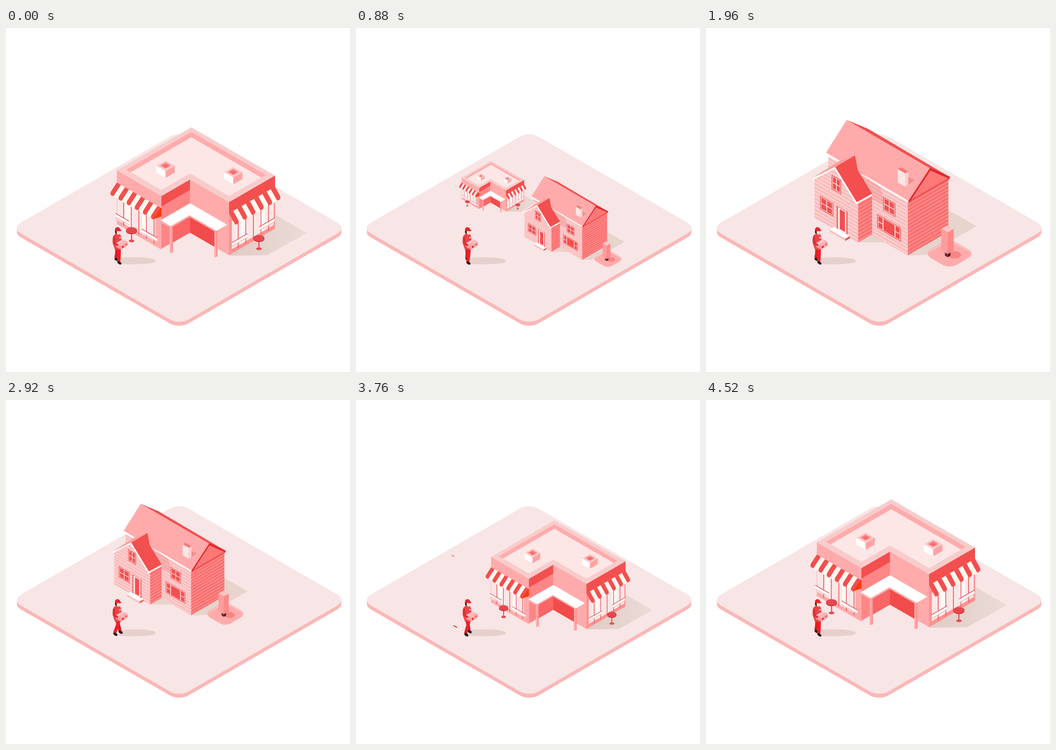
These frames come from a looping animation (748 by 748 pixels, 5.24 s). An HTML page:

```html
<!DOCTYPE html>
<html>
<head>
<meta charset="utf-8">
<style>
html, body { margin: 0; width: 100%; height: 100%; overflow: hidden; background: #fff }
svg { display: block; width: 100vw; height: 100vh }
</style>
</head>
<body>
<svg id="stage" viewBox="0 0 748 748"></svg>
<script>
const RED = '#f34f4f', DEEP = '#e5262b', PINK = '#ffabab', MID = '#ff8686', PALE = '#fde6e6', RIM = '#f9cccc', FRAME = '#ee6a6c';
const SHINE = '#fff8f6', SHADOW = '#e6d4cd';
const K = Math.tan(Math.PI / 6); // slope of every isometric edge

const poly = (fill, points) => `<polygon fill="${fill}" points="${points}"/>`;
const path = (fill, d) => `<path fill="${fill}" d="${d}"/>`;
const line = (color, width, d, cap = 'butt') =>
  `<path fill="none" stroke="${color}" stroke-width="${width}" stroke-linecap="${cap}" d="${d}"/>`;
const oval = (fill, x, y, rx, ry, turn = 0) =>
  `<ellipse fill="${fill}" cx="${x}" cy="${y}" rx="${rx}" ry="${ry}" transform="rotate(${turn} ${x} ${y})"/>`;
const rect = (fill, x, y, w, h) => `<rect fill="${fill}" x="${x}" y="${y}" width="${w}" height="${h}"/>`;
const repeat = (n, f) => [...Array(n).keys()].map(f).join('');

// Upright face: dir 1 looks to the lower left, -1 to the lower right
const wall = (fill, x, y, w, h, dir = 1) => path(fill, `M${x} ${y}l${w} ${w * K * dir}v${h}l${-w} ${-w * K * dir}z`);

// Level face from its back corner; steps alternate right-down and left-down
const level = (fill, x, y, steps) =>
  path(fill, `M${x} ${y}` + steps.map((s, i) => `l${i % 2 ? -s : s} ${s * K}`).join('') + 'z');

// Box from its front top corner
const box = (x, y, a, b, h, left, right, top) => wall(left, x - a, y - a * K, a, h) + wall(right, x, y, b, h, -1) +
  level(top, x + b - a, y - (a + b) * K, [a, b, -a]);

const roundTile = (fill, x, y, size, r) => `<rect fill="${fill}" x="${-size / 2}" y="${-size / 2}" width="${size}"
  height="${size}" rx="${r}" transform="matrix(.866 .5 -.866 .5 ${x} ${y})"/>`;

const siding = (id, turn, base, stripe) =>
  `<pattern id="${id}" width="20" height="8" patternUnits="userSpaceOnUse" patternTransform="skewY(${turn})">
    ${rect(base, 0, 0, 20, 8)}${rect(stripe, 0, 0, 20, 3.6)}</pattern>`;

const ground = () => repeat(3, i => roundTile(i < 2 ? '#fbb7b7' : '#f8e5e5', 376.5, 443.5 - i * 4.25, 421, 23));

// Striped cloth hung from a top edge of width w, leaning out by dx
function awning(x, y, w, dir, dx) {
  const n = 11, sx = w / n, sy = sx * K * dir, drop = 20;
  return repeat(n, i => path(i % 2 ? '#fff8ee' : RED, `M${x + sx * i} ${y + sy * i}l${sx} ${sy}l${dx} ${drop}
    q${dx * .2} 6 ${dx * .2 - sx / 2} ${6 - sy / 2}q${-sx / 2} ${-sy / 2} ${-sx / 2 - dx * .2} ${-6 - sy / 2}z`));
}

const vent = (x, y) => box(x, y, 20, 20, 15, '#fff', '#ffa3a3', RIM) +
  level(MID, x, y - 19, [12, 12, -12]) + level('#f76b6b', x, y - 15, [7, 7, -7]);

const table = (x, y) => oval('#e8484c', x, y + 23, 6, 3) + line(RED, 2.5, `M${x} ${y}v23`) +
  oval('#b93640', x, y + 1.5, 12, 7) + oval('#e5474c', x, y, 12, 7);

const ledge = (x, y, w, dir) => wall('#e2575c', x, y - 5, w, 2, dir) + wall('#fff', x, y - 3, w, 6, dir) +
  wall('#f7b9b9', x, y + 3, w, 2, dir);

const shopWindow = (x, y, w, dir) => wall(PALE, x, y, w, 61, dir) +
  [.2, .65].map(k => wall(SHINE, x + w * k, y + w * k * K * dir, 13, 61, dir)).join('') +
  repeat(5, i => wall('#e2575c', x + 13 + 16.5 * i, y + (13 + 16.5 * i) * K * dir, 1.7, 66, dir));

function shop() {
  const roof = (fill, y, inset) => level(fill, 403, y, [182 - inset, 100 - inset, -85, 62, inset - 97]);
  const counter = (fill, y) => level(fill, 400, y, [81, 23, -59, 41, -22]);
  const post = (x, y) => rect(PINK, x, y, 4, 57) + rect('#ff9090', x + 4, y, 3, 56);
  return poly('url(#shade)', '485,495 568,494 654,446 585,406') +
    wall(PINK, 241, 309, 97, 117) +
    wall(MID, 338, 365, 62, 115, -1) + wall(RED, 338, 365, 62, 23, -1) +
    wall(PINK, 400, 329, 85, 116) +
    wall('#ff9292', 485, 378, 100, 116, -1) + wall(RED, 485, 378, 100, 25, -1) +
    roof(RIM, 216, 0) + roof(PINK, 226, 20) + roof(PALE, 237.5, 30) +
    vent(347, 311) + vent(494, 325) +
    shopWindow(242, 356, 83, 1) + ledge(238, 407, 30, 1) + ledge(295, 441, 34, 1) +
    awning(241, 336, 97, 1, -13) + poly('#ff3a0c', '338,390 338,410 319,416') +
    shopWindow(491, 420, 91, -1) + ledge(491, 471, 34, -1) + ledge(550, 437, 34, -1) +
    awning(485, 403, 100, -1, 11) +
    wall('#fa6565', 362, 431, 38, 36, -1) + wall('#f24b4b', 400, 409, 55, 36) +
    counter(PINK, 385) + counter('#fff', 381) + post(356, 432) + post(453, 441) +
    table(273, 440) + table(550, 457);
}

// Framed window of n panes across; the middle one of three is plain and wide
function pane(x, y, w, h, n = 2) {
  const gap = 1.6, side = n > 2 ? 9 : (w - 6 - gap) / 2;
  const column = k => rect(RED, k, 3, side, h / 2 - 4) + rect(RED, k, h / 2 + gap / 2, side, h / 2 - 4);
  return `<g transform="matrix(1 ${K} 0 1 ${x} ${y})">` + rect(FRAME, 0, 0, w, h) + rect(PALE, 2, 2, w - 4, h - 4) +
    column(3) + column(w - 3 - side) + (n > 2 ? rect(RED, 14, 3, w - 28, h - 6) : '') + '</g>';
}

function planter(x, y) {
  return roundTile('#f58c8c', x, y - 1, 65, 18) + roundTile('#fff', x, y - .5, 63, 17) + roundTile(PINK, x, y + .8, 63, 17) +
    oval('#f98484', x + 11, y + 2, 14, 8) + box(x - 4, y, 6, 6, 7, '#5d2f2c', '#472220', '#5d2f2c') +
    box(x - 4, y - 47, 14, 13, 47, '#ff9c9c', '#f88', '#fcc4c4');
}

function house() {
  return poly(SHADOW, '439,495 480,493 588,431 527,396') + poly(SHADOW, '331,466 361,447 412,466') +
    // main block
    wall('url(#front)', 266, 277, 173, 118) + wall('url(#side)', 439, 378, 88, 116, -1) +
    poly('#ff7878', '487,307 527,328 441,377') + wall(RED, 441, 376, 88, 4, -1) +
    poly(RED, '306,200 352,219 530,324 487,306') +
    wall('#fff', 262, 272, 178, 5) + poly(PINK, '306,200 487,305 440,376 261,271') +
    line(DEEP, 3.5, 'M441 378L488 306') + line(DEEP, 5, 'M486 306L530 326') +
    poly('#f08f8f', '440,324 454,331 434,345') + box(433, 316, 16, 7, 29, PALE, '#f9cfcf', '#f97a7a') +
    poly('#f4606040', '330,309 378,345 392,386 361,372') +
    pane(385, 366, 27, 30) + pane(372, 404, 52, 31, 3) +
    // wing
    poly('url(#front)', '236,327 280,304 331,381 331,466 236,413') + wall('url(#side)', 331, 381, 30, 85, -1) +
    poly('#ff9d9d', '233,325 288,290 324,277 280,304') + poly(RED, '280,303 324,277 330,309 361,360 327,380') +
    line('#fff', 3.5, 'M233 328L280 304L327 381L361 363') +
    pane(273, 319, 21, 31) + pane(248, 364, 29, 30) +
    wall(FRAME, 284, 386, 24, 51) + wall(PALE, 287, 389, 18, 48) + wall(RED, 291, 394, 11, 43) +
    box(303, 458, 34, 10, 5, '#f9c0c0', RED, '#fff') + planter(529.5, 491.5);
}

const courierTop =
  path('#ee4348', 'M234 451Q239 446 246 447Q251 450 251 460L250 482H237L232 468Q231 456 234 451Z') +
  oval('#fff', 248, 456, 2, 1.3) + oval('#2a1d20', 240, 443, 3, 4.5) + oval('#fbd3c4', 244.5, 444, 4, 5.5) +
  path(DEEP, 'M237 441Q236 433 243 433Q248 434 248 438L252 440L248 442Z') +
  box(250, 474, 11, 15, 8, '#ff9c9c', '#ffa5a5', '#ffb3b3') + wall(PALE, 244, 467, 15, 2, -1) +
  wall(DEEP, 252, 475, 4, 4, -1) + wall(RED, 259, 470, 4, 3, -1) +
  line('#d92f36', 4, 'M235 455L236 468L242 472', 'round');
const courierShadow = path('#e5d0cb', 'M244 500Q298 496 322 503Q332 508 318 511Q290 515 246 513Z');

const unit = v => Math.max(0, Math.min(1, v));
const smooth = u => u * u * (3 - 2 * u);
const grow = (t, start, end, power) => 1 - (1 - unit((t - start) / (end - start))) ** power;
const HALF = 2720;

function leg(side, angle) {
  const hip = 243.5 + 2.5 * side, x = 243 + 7 * side * Math.cos(angle), y = 507 + 4 * side * Math.max(0, Math.sin(angle));
  return line(side < 0 ? '#dc1c22' : '#ec2026', 7, `M${hip} 479Q${(hip + x) / 2 + 1} 490 ${x - 1} ${y - 3}`) +
    oval('#2b1b1d', x + .5, y, 5, 2.9, 32);
}

// Two full strides per walk, resting in the starting pose
function courier(t) {
  const walked = t < HALF ? unit(t / 1680) : unit((t - HALF) / 1800);
  const angle = 1.13 + 4 * Math.PI * walked;
  return courierShadow + leg(-1, angle) + leg(1, angle) + courierTop;
}

// Short streak that runs past behind the courier
function dash(t) {
  const [start, gap, end] = t < HALF ? [540, 390, 1960] : [3210, 460, 4500];
  const u = (t - start) % gap / 250;
  if (t < start || t >= end || u >= 1) return '';
  const point = k => `${211 + 13 * k} ${489.5 + 7.5 * k}`;
  return line(DEEP, 2, `M${point(unit(u * 1.4 - .4))}L${point(unit(u * 1.3 + .2))}`);
}

function place(el, s, x, y) {
  el.setAttribute('transform', `translate(${x * (1 - s)} ${y * (1 - s)}) scale(${s})`);
  el.setAttribute('visibility', s > .002 ? 'visible' : 'hidden');
}

const stage = document.getElementById('stage');
stage.innerHTML = `<defs>${siding('front', 30, '#fccfcf', '#f9b9b9')}${siding('side', -30, '#ff8787', '#f76a6a')}
  <linearGradient id="shade"><stop stop-color="#dfcbc5"/><stop offset="1" stop-color="#ebdcd7"/></linearGradient></defs>
  ${ground()}<g id="house">${house()}</g><g id="shop">${shop()}</g><g id="walker"></g>`;
const [houseEl, shopEl, walkerEl] = ['house', 'shop', 'walker'].map(id => document.getElementById(id));

function draw(now) {
  const t = Math.floor(now % 5240 / 40) * 40;
  if (t < HALF) {
    place(shopEl, 1 - smooth(unit((t - 310) / 1000)), 222, 336.5);
    place(houseEl, grow(t, 556, 1680, 2.83), 577, 520);
  } else {
    const s = 1 - smooth(unit((t - HALF) / 1160) ** .75);
    place(houseEl, s, 207 + 30 * s, 338 + 9.6 * s);
    place(shopEl, grow(t, 3232, 4400, 3.15), 592, 520);
  }
  walkerEl.innerHTML = dash(t) + courier(t);
  requestAnimationFrame(draw);
}
draw(0);
</script>
</body>
</html>
```
